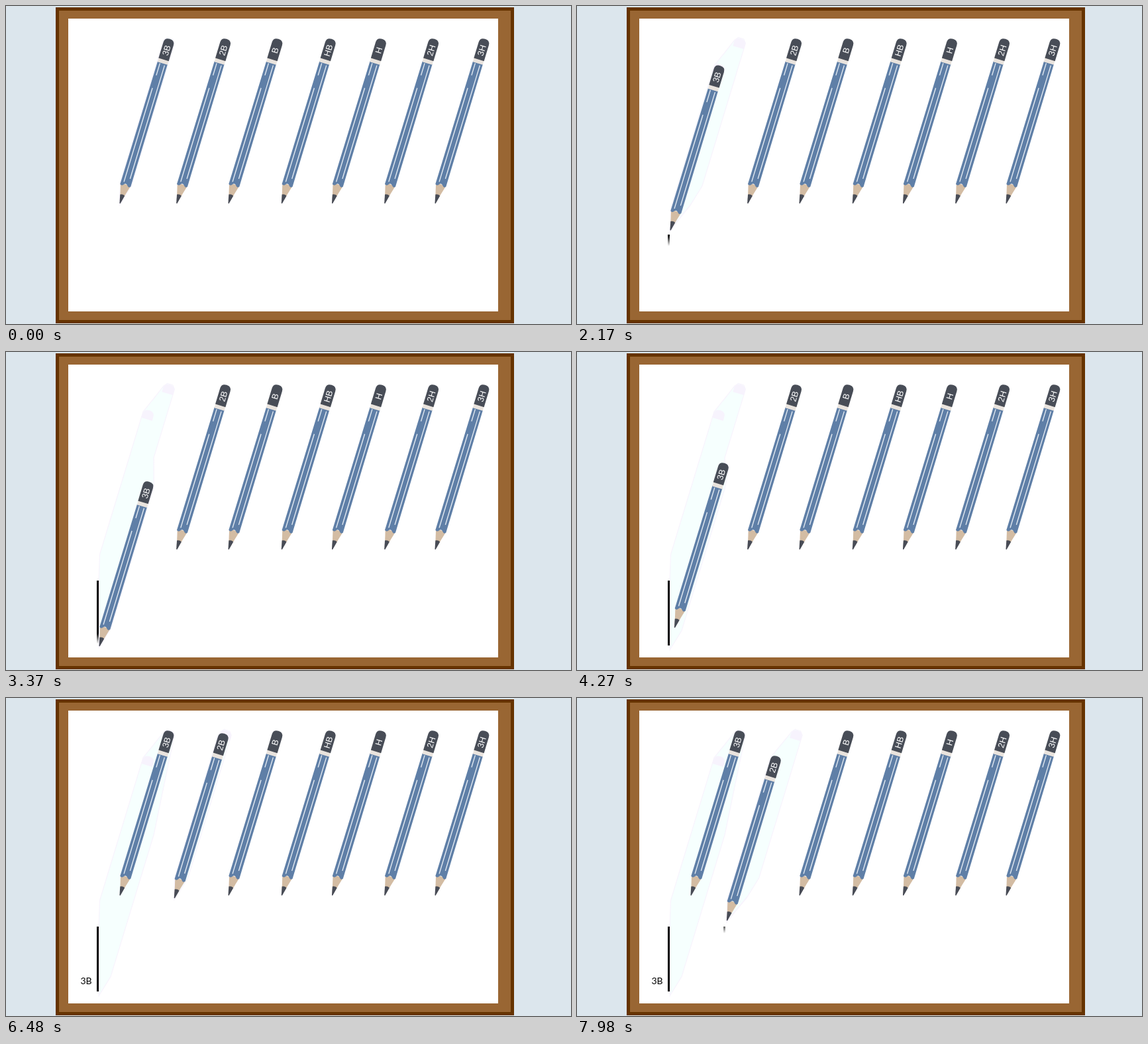
Animation of 853 by 480 pixels, one loop 8 s. Source, as an HTML page:

```html
<!DOCTYPE html>
<html lang="en">
<head>
<meta charset="utf-8">
<title>Pencil grades</title>
<style>
  html, body { margin: 0; width: 100%; height: 100%; overflow: hidden; background: #dce6ed; }
  svg { display: block; width: 100vw; height: 100vh; }
  .grade { font: 13px "Liberation Sans", Arial, sans-serif; fill: #fff; text-anchor: middle; }
  .label { font: 14px Lato, "Open Sans", sans-serif; }
</style>
</head>
<body>
<svg viewBox="0 0 853 480">
  <defs>
    <!-- The pencil stands on its tip at the origin. -->
    <g id="pencil">
      <path d="M-8 -30 L0 0 L8 -30Z" fill="#d3bca3"/>
      <path d="M-3.6 -13 Q0 -15 3.6 -13 L.6 0 H-.6Z" fill="#484c56"/>
      <path d="M-7.8 -222 H7.8 L8.2 -29 Q5.5 -25.500 3 -29 Q0 -33 -3 -29 Q-5.500 -25.500 -8.200 -28Z" fill="#5f7fa7"/>
      <path d="M-3.700 -220 V-201 M-3.700 -181 V-33 M3.900 -219 V-40" stroke="#eaf0f6" stroke-width="1.300"/>
      <path d="M-7.800 -227.500 H7.800 V-221 H-7.800Z" fill="#e9e3dd"/>
      <path d="M-8 -227 V-252 Q-8 -259.500 0 -259.500 Q8 -259.500 8 -252 V-227Z" fill="#484d57"/>
    </g>
    <path id="cap" d="M-8.500 -246 V-252 Q-8 -260 0 -260 Q8 -260 8.500 -252 V-246Z" fill="#f7f3fd"/>
  </defs>
  <rect width="853" height="480" fill="#dce6ed"/>
  <rect x="77.500" y="4.500" width="687" height="472" fill="#996633" stroke="#663300" stroke-width="5"/>
  <rect x="94" y="19" width="649" height="442" fill="#fff"/>
  <g id="trails"></g>
  <g id="lines"></g>
  <text id="label" class="label" x="112.500" y="432">3B</text>
  <g id="pencils"></g>
</svg>
<script>
const LOOP = 8000, TILT = 16.9, TIP = [172, 298];
const GRADES = ['3B', '2B', 'B', 'HB', 'H', '2H', '3H'];
const SHIFTS = [0, 85.7, 164, 244.3, 320.5, 399.7, 476];
const $ = id => document.getElementById(id);

function add(parent, tag, attrs, text) {
  const el = document.createElementNS('http://www.w3.org/2000/svg', tag);
  for (const k in attrs) el.setAttribute(k, attrs[k]);
  if (text) el.textContent = text;
  return parent.appendChild(el);
}

const clamp = u => Math.max(0, Math.min(1, u));
const ease = u => u < 0.5 ? 2 * u * u : 1 - 2 * (1 - u) ** 2;

// Each move: start time, duration, dx, dy.
const actors = [
  { index: 0, lineX: 137, lineStart: 1905,
    moves: [[-10, 1850, -31, 38.8], [2040, 1500, 0, 110.2], [3740, 1650, 31, -149]] },
  { index: 1, lineX: 221, lineStart: 7825,
    moves: [[6085, 1700, -31.3, 38]] }
];

function offset(actor, t) {
  let x = 0, y = 0;
  for (const [start, span, dx, dy] of actor.moves) {
    const p = ease(clamp((t - start) / span));
    x += dx * p;
    y += dy * p;
  }
  return [x, y];
}

const place = (i, [x, y]) =>
  `translate(${(TIP[0] + SHIFTS[i] + x).toFixed(2)} ${(TIP[1] + y).toFixed(2)}) rotate(${TILT})`;

const pencils = GRADES.map((grade, i) => {
  const g = add($('pencils'), 'g', { transform: place(i, [0, 0]) });
  add(g, 'use', { href: '#pencil' });
  add(g, 'text', { class: 'grade', transform: 'translate(4.5 -241.500) rotate(-90)' }, grade);
  return g;
});

// Silhouette corners of the tilted pencil, for the pale swept area.
const angle = TILT * Math.PI / 180, cos = Math.cos(angle), sin = Math.sin(angle);
const outline = [[-8, -30], [-8, -255], [-4, -260], [4, -260], [8, -255], [8, -30], [0, 0]]
  .map(([x, y]) => [x * cos - y * sin, x * sin + y * cos]);

for (const a of actors) {
  const g = add($('trails'), 'g', {});
  a.edge = add(g, 'path', { fill: 'none', stroke: '#f8f4fd', 'stroke-width': 2.5 });
  a.wash = add(g, 'path', { fill: '#f6fffe' });
  a.caps = a.moves.slice(0, 2).map(([start]) =>
    [start, add(g, 'use', { href: '#cap', transform: place(a.index, offset(a, start)) })]);
  const id = 'wipe' + a.index;
  a.wipe = add($('lines'), 'linearGradient', { id, gradientUnits: 'userSpaceOnUse', x1: 0, x2: 0 });
  add(a.wipe, 'stop', { offset: 0 });
  add(a.wipe, 'stop', { offset: 1, 'stop-opacity': 0 });
  a.line = add($('lines'), 'rect', { x: a.lineX, y: 345, width: 3, height: 98, fill: `url(#${id})` });
}

function sweep(actor, t) {
  const [first] = actor.moves, last = actor.moves[actor.moves.length - 1];
  const end = Math.min(t, last[0] + last[1]);
  let d = '';
  for (let s = Math.max(0, first[0]); s <= end; s += 30) {
    const [x, y] = offset(actor, s);
    const ox = TIP[0] + SHIFTS[actor.index] + x, oy = TIP[1] + y;
    d += 'M' + outline.map(([px, py]) => `${(ox + px).toFixed(1)} ${(oy + py).toFixed(1)}`).join('L') + 'Z';
  }
  return d;
}

function draw(t) {
  for (const a of actors) {
    pencils[a.index].setAttribute('transform', place(a.index, offset(a, t)));
    const d = sweep(a, t);
    a.edge.setAttribute('d', d);
    a.wash.setAttribute('d', d);
    for (const [start, cap] of a.caps) cap.style.display = t > start + 60 ? '' : 'none';
    const front = 345 + 0.065 * (t - a.lineStart);
    a.line.style.display = front > 345 ? '' : 'none';
    a.wipe.setAttribute('y1', front - 16);
    a.wipe.setAttribute('y2', front);
  }
  $('label').style.display = t >= 6000 ? '' : 'none';
}

const begin = performance.now();
function tick() {
  draw((performance.now() - begin) % LOOP);
  requestAnimationFrame(tick);
}
tick();
</script>
</body>
</html>
```
